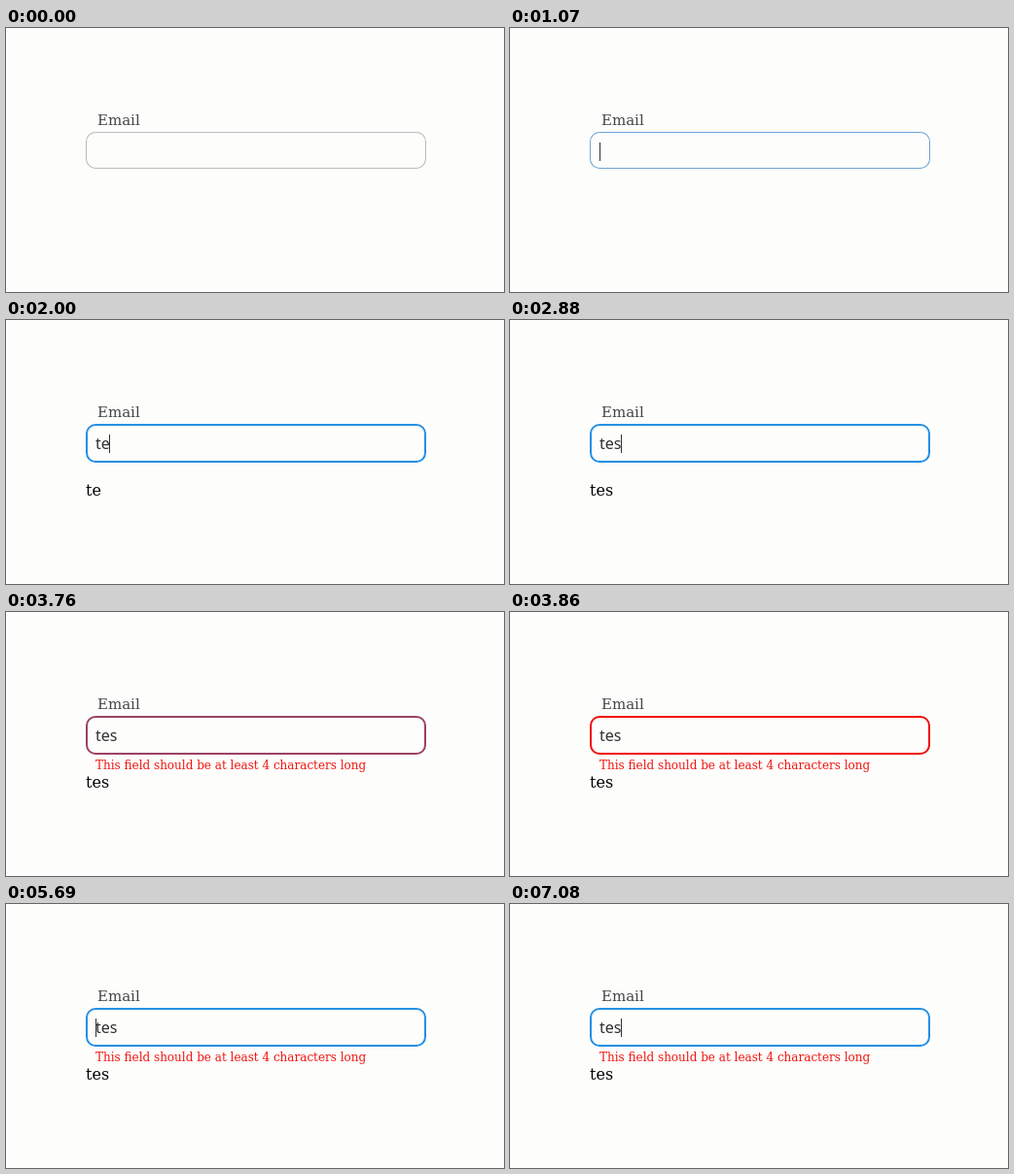
These frames come from a looping animation (512x272 px, 8 s). An HTML page with a canvas:

```html
<!DOCTYPE html>
<html lang="en">
<head>
<meta charset="utf-8">
<title>Email field</title>
<style>
  html, body { margin: 0; width: 100%; height: 100%; overflow: hidden; background: #fdfdfc; }
  canvas { display: block; }
</style>
</head>
<body>
<canvas id="stage" width="512" height="272"></canvas>
<script>
const ctx = document.getElementById('stage').getContext('2d', { alpha: false });

const LOOP = 8000;
const FADE = 150;
const SERIF = '"DejaVu Serif", serif';
const SANS = '"Noto Sans", "Open Sans", sans-serif';
const GREY = [187, 187, 187];
const BLUE = [36, 144, 228];
const RED = [240, 10, 6];

// Each track lists [start time, value].
const borders = [[-FADE, GREY, 1], [1025, BLUE, 2], [3710, RED, 2], [4765, BLUE, 2]];
const typed = [[0, ''], [1920, 't'], [2000, 'te'], [2240, 't'], [2700, 'te'], [2880, 'tes']];
// Caret position counted in characters; -1 hides it.
const carets = [
  [0, -1], [1040, 0], [1920, 1], [2000, 2], [2240, 1], [2700, 2], [2880, 3], [3450, -1],
  [4770, 0], [4980, 3], [5690, 0], [5970, -1], [6140, 0], [6540, 2], [7040, -1], [7080, 3]
];
const ERROR_AT = 3720;

const indexAt = (track, t) => track.findLastIndex(step => step[0] <= t);
const valueAt = (track, t) => track[indexAt(track, t)][1];
const mix = (a, b, k) => a + (b - a) * k;

// CSS "ease": cubic-bezier(.25, .1, .25, 1)
function ease(x) {
  if (x <= 0) return 0;
  if (x >= 1) return 1;
  const bez = (p, q, u) => 3 * p * u * (1 - u) ** 2 + 3 * q * u * u * (1 - u) + u ** 3;
  let lo = 0, hi = 1;
  for (let i = 0; i < 20; i++) {
    const mid = (lo + hi) / 2;
    if (bez(0.25, 0.25, mid) < x) lo = mid; else hi = mid;
  }
  return bez(0.1, 1, lo);
}

function text(str, x, y, size, family, color) {
  ctx.font = `${size}px ${family}`;
  ctx.fillStyle = color;
  ctx.fillText(str, x, y);
}

function drawBorder(t) {
  const i = indexAt(borders, t);
  const [start, color, width] = borders[i];
  const [, oldColor, oldWidth] = borders[Math.max(0, i - 1)];
  const k = ease((t - start) / FADE);
  const w = Math.floor(mix(oldWidth, width, k) + 0.01);
  const rgb = color.map((c, n) => Math.round(mix(oldColor[n], c, k)));
  const h = 36 + 2 * w;
  ctx.beginPath();
  ctx.roundRect(82, 107, 350, h, 10);
  ctx.roundRect(82 + w, 107 + w, 350 - 2 * w, h - 2 * w, 10 - w);
  ctx.fillStyle = `rgb(${rgb})`;
  ctx.fill('evenodd');
}

function draw(t) {
  ctx.fillStyle = '#fdfdfc';
  ctx.fillRect(0, 0, 512, 272);

  text('Email', 94, 100, 15, SERIF, '#444');
  drawBorder(t);

  const value = valueAt(typed, t);
  text(value, 82, 181, 16, SERIF, '#000');
  if (t >= ERROR_AT) {
    text('This field should be at least 4 characters long', 92, 162, 12, SERIF, '#f01510');
  }

  text(value, 92, 133, 16, SANS, '#303030');
  const pos = valueAt(carets, t);
  if (pos >= 0) {
    const x = 92 + Math.floor(ctx.measureText(value.slice(0, pos)).width);
    ctx.fillRect(x, 118, 1, 19);
  }
}

const begin = performance.now();
function tick() {
  draw((performance.now() - begin) % LOOP);
  requestAnimationFrame(tick);
}
tick();
</script>
</body>
</html>
```
